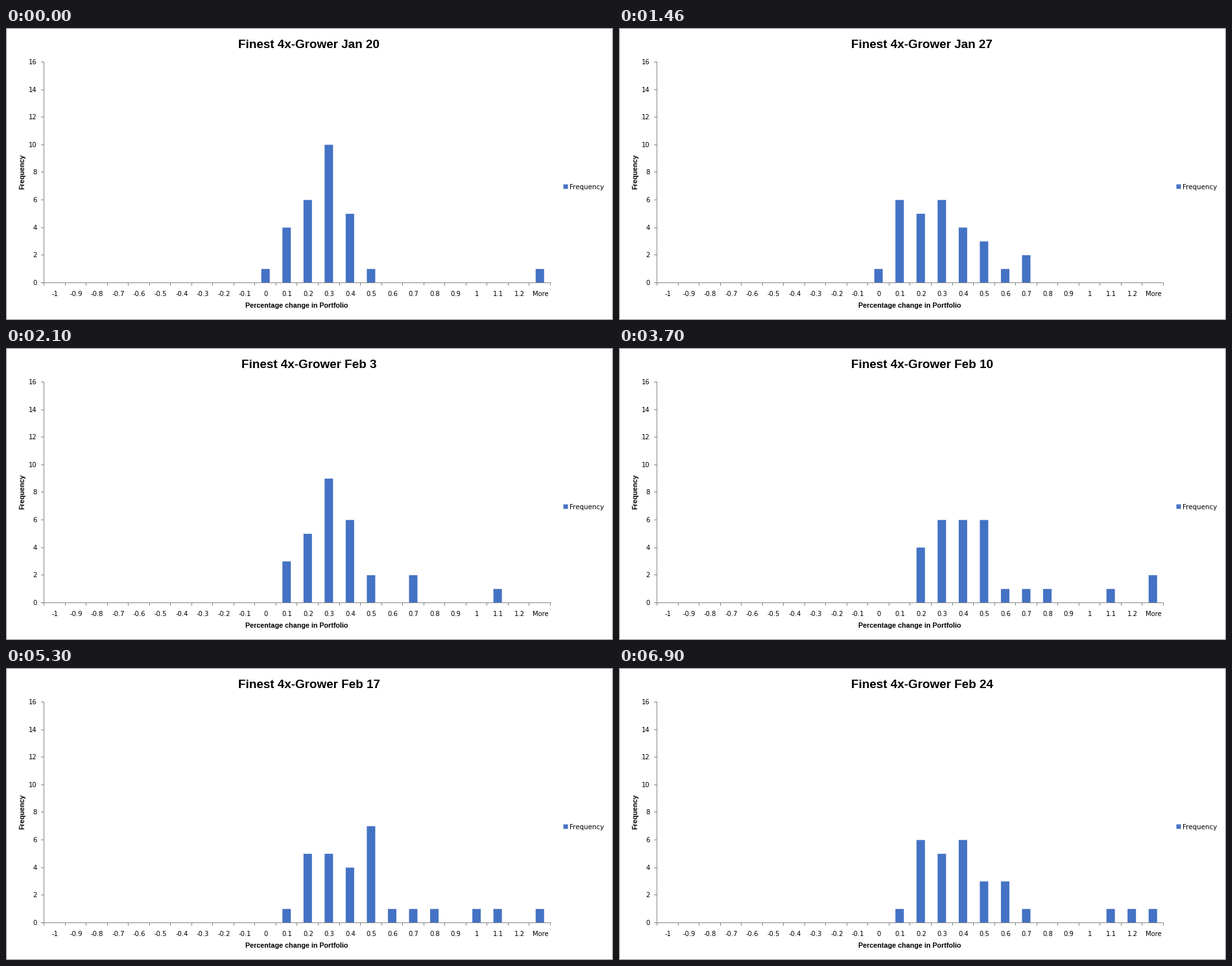
A matplotlib script that plays this animation: 936x451 px, repeating every 8 s.

```python
import matplotlib.pyplot as plt
from matplotlib.animation import FuncAnimation
from matplotlib.patches import Rectangle

W, H = 936, 451
LEFT, RIGHT, TOP, BASE = 58, 839, 52, 393
BLUE, GREY = "#4472C4", "#868686"
BINS = [f"{i / 10:g}" for i in range(-10, 13)] + ["More"]
STEP = (RIGHT - LEFT) / len(BINS)
UNIT = (BASE - TOP) / 16
BAR = STEP / 2.5  # the gap is 150 % of the bar
HOLDINGS = 28

# Per week: first bin, run of counts from there, lone bins beyond the run.
# Holdings left over fall into "More".
WEEKS = [
    ("0", [1, 4, 6, 10, 5, 1], []),
    ("0", [1, 6, 5, 6, 4, 3, 1, 2], []),
    ("0.1", [3, 5, 9, 6, 2, 0, 2], ["1.1"]),
    ("0.2", [4, 6, 6, 6], ["0.6", "0.7", "0.8", "1.1"]),
    ("0.1", [1, 5, 5, 4, 7], ["0.6", "0.7", "0.8", "1", "1.1"]),
    ("0.1", [1, 6, 5, 6, 3, 3, 1], ["1.1", "1.2"]),
]

plt.rcParams["font.family"] = "DejaVu Sans"
fig = plt.figure(figsize=(W / 72, H / 72), dpi=72, facecolor="white")
ax = fig.add_axes([0, 0, 1, 1])
ax.set_xlim(0, W)
ax.set_ylim(H, 0)
ax.axis("off")


def rect(x, y, w, h, color, smooth=False):
    patch = Rectangle((x, y), w, h, fc=color, ec="none", lw=0,
                      antialiased=smooth, snap=False)
    return ax.add_patch(patch)


def label(x, y, text, ha="center", size=10, **kw):
    return ax.text(x, y, text, ha=ha, va="baseline", fontsize=size,
                   color="black", **kw)


def bold(x, y, text, size=10.7, **kw):
    return label(x, y, text, size=size, family="Liberation Sans",
                 weight="bold", **kw)


def center(i):
    return LEFT + 0.5 + (i + 0.5) * STEP


def week_date(week):
    day = 20 + 7 * week
    return f"Jan {day}" if day <= 31 else f"Feb {day - 31}"


def week_counts(week):
    first, run, lone = WEEKS[week]
    counts = [0] * len(BINS)
    start = BINS.index(first)
    counts[start:start + len(run)] = run
    for name in lone:
        counts[BINS.index(name)] = 1
    counts[-1] = HOLDINGS - sum(counts)
    return counts


# Outer border
for x, y, w, h in [(0, 0, W, 1), (0, H - 1, W, 1), (0, 0, 1, H), (W - 1, 0, 1, H)]:
    rect(x, y, w, h, GREY)

bars = [rect(center(i) - BAR / 2, BASE, BAR, 0, BLUE, smooth=True)
        for i in range(len(BINS))]

# Axes, ticks and tick labels
rect(LEFT, TOP, 1, BASE - TOP + 1, GREY)
rect(LEFT, BASE, RIGHT - LEFT, 1, GREY)
for v in range(0, 17, 2):
    y = round(BASE - v * UNIT)
    rect(LEFT - 4, y, 4, 1, GREY)
    label(48, y + 4, str(v), ha="right")
for i in range(len(BINS) + 1):
    rect(round(LEFT + i * STEP), BASE, 1, 5, GREY)
for i, name in enumerate(BINS):
    label(center(i) + 0.7, 414, name)

# Axis titles, legend and chart title
bold(448, 432, "Percentage change in Portfolio")
bold(28.5, 221.5, "Frequency", rotation=90, rotation_mode="anchor")
rect(859.5, 241.5, 7, 7, BLUE, smooth=True)
label(869, 249, "Frequency", ha="left", size=10.3)
title = bold(467.3, 31, "", size=18.9)


def draw(frame):
    # The first week shows for 0.5 s, the others for 1.6 s each
    week = (frame + 11) // 16
    title.set_text(f"Finest 4x-Grower {week_date(week)}")
    for bar, n in zip(bars, week_counts(week)):
        bar.set_y(BASE + 0.5 - n * UNIT)
        bar.set_height(n * UNIT)
        bar.set_visible(n > 0)
    return [title, *bars]


anim = FuncAnimation(fig, draw, frames=80, interval=100, repeat=True,
                     repeat_delay=0, blit=False)
plt.show()
```
